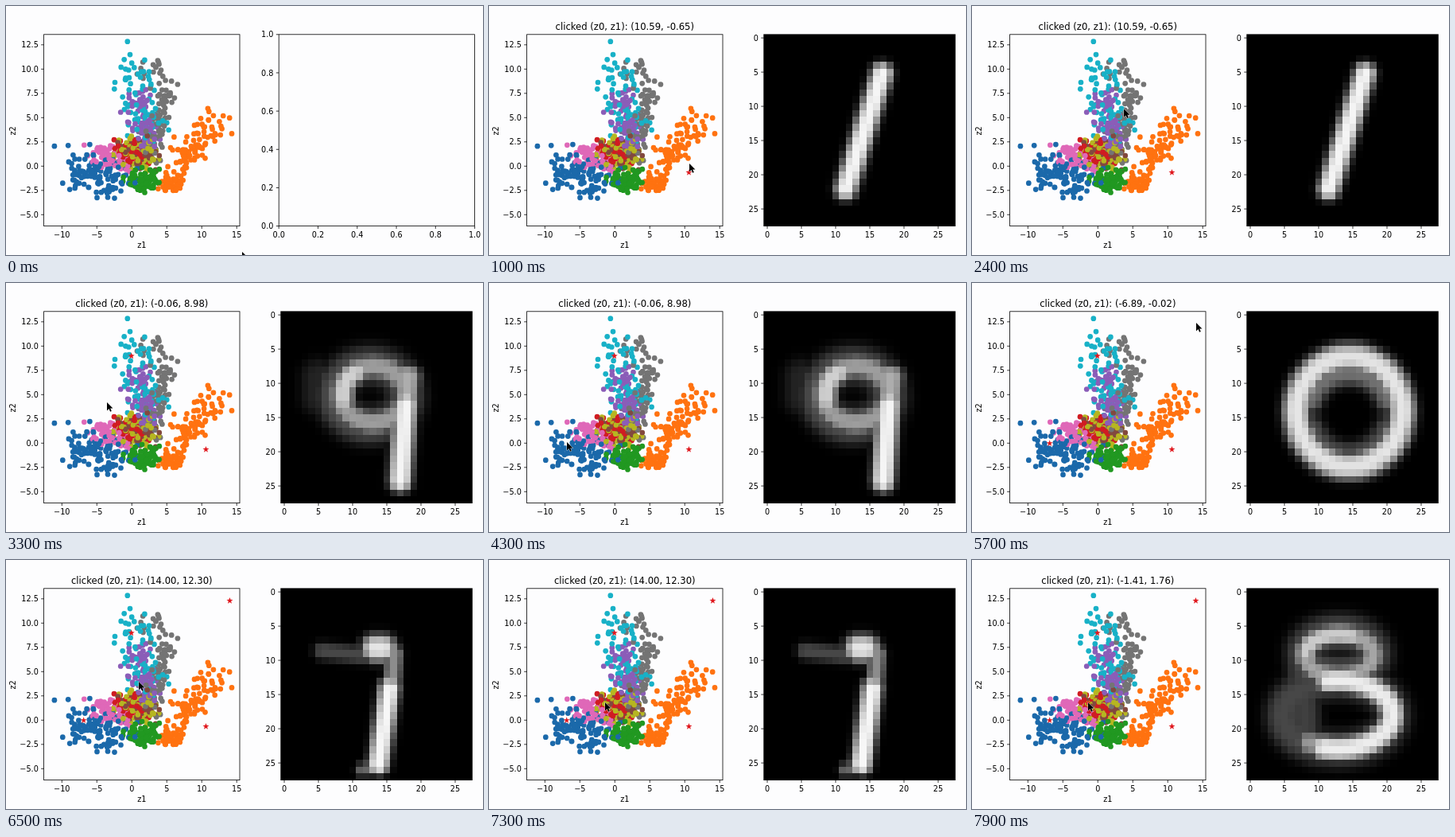
Animation, 600 px wide and 313 px high, one loop 8000 ms. Source, as an HTML page with a canvas:

```html
<!DOCTYPE html>
<html lang="en">
<head>
<meta charset="utf-8">
<title>Latent space explorer</title>
<style>
  html, body { margin: 0; width: 100%; height: 100%; overflow: hidden; background: #fdfdfe; }
  #stage { position: relative; width: 600px; height: 313px; overflow: hidden; }
  svg { position: absolute; left: 0; top: 0; }
  canvas { position: absolute; left: 345.7px; top: 35.8px; width: 240.8px; height: 240.8px; image-rendering: pixelated; }
  text { font: 9.68px "DejaVu Sans", sans-serif; fill: #000; }
  #title { font-size: 11.62px; }
  .line { fill: none; stroke: #000; stroke-width: .8; }
</style>
</head>
<body>
<div id="stage">
  <canvas id="digit" width="28" height="28"></canvas>
  <svg width="600" height="313" viewBox="0 0 600 313">
    <g id="dots"></g>
    <g id="stars" fill="#e0181e"></g>
    <g id="left"></g>
    <g id="unit"></g>
    <g id="pixels"></g>
    <text id="title" x="170.8" y="30.1" text-anchor="middle"></text>
    <path id="cursor" d="M0 0V10.4L2.5 8.1L4.1 11.8L5.8 11L4.2 7.4H7.5Z" stroke="#fff" stroke-width=".8" paint-order="stroke"/>
  </svg>
</div>
<script>
const LOOP = 8000, STEP = 100;
const TOP = 35.8, SIDE = 240.8, BOTTOM = TOP + SIDE, WIDE = 246.4;
const $ = id => document.getElementById(id);
const mix = (a, b, k) => a + (b - a) * k;
const toX = v => 158.3 + v * 8.797;
const toY = v => 201.3 - v * 12.2;

function add(parent, tag, attrs, label) {
  const el = document.createElementNS("http://www.w3.org/2000/svg", tag);
  for (const key in attrs) el.setAttribute(key, attrs[key]);
  if (label !== undefined) el.textContent = label;
  parent.append(el);
  return el;
}

// Axes
function ticks(from, to, by, digits, place) {
  const list = [];
  for (let v = from; v <= to + by / 9; v += by)
    list.push([v.toFixed(digits).replace("-", "−"), place(v)]);
  return list;
}
function axes(group, x, width, xTicks, yTicks) {
  add(group, "rect", { x, y: TOP, width, height: SIDE, class: "line" });
  for (const [label, px] of xTicks) {
    add(group, "path", { d: `M${px} ${BOTTOM}v3.4`, class: "line" });
    add(group, "text", { x: px, y: 291, "text-anchor": "middle" }, label);
  }
  for (const [label, py] of yTicks) {
    add(group, "path", { d: `M${x} ${py}h-3.4`, class: "line" });
    add(group, "text", { x: x - 6.8, y: py + 3.6, "text-anchor": "end" }, label);
  }
}
const cell = SIDE / 28;
axes($("left"), 47.6, WIDE, ticks(-10, 15, 5, 0, toX), ticks(-5, 12.5, 2.5, 1, toY));
add($("left"), "text", { x: 170.8, y: 303.8, "text-anchor": "middle" }, "z1");
add($("left"), "text", { transform: "translate(11.6 157) rotate(-90)", "text-anchor": "middle" }, "z2");
axes($("unit"), 343.2, WIDE, ticks(0, 1, .2, 1, v => 343.2 + v * WIDE), ticks(0, 1, .2, 1, v => BOTTOM - v * SIDE));
axes($("pixels"), 345.7, SIDE, ticks(0, 25, 5, 0, v => 345.7 + (v + .5) * cell), ticks(0, 25, 5, 0, v => TOP + (v + .5) * cell));

// Scatter: each cloud runs from one point and spread to another
let seed = 29;
function random() {
  seed = seed + 0x6D2B79F5 | 0;
  let n = Math.imul(seed ^ seed >>> 15, 1 | seed);
  n = n + Math.imul(n ^ n >>> 7, 61 | n) ^ n;
  return ((n ^ n >>> 14) >>> 0) / 4294967296;
}
const bell = () => (random() + random() + random() - 1.5) * 2;

const dots = [];
function cloud(ink, count, [ax, ay, aw], [bx, by, bw]) {
  for (let i = 0; i < count; i++) {
    const k = random(), w = mix(aw, bw, k);
    dots.push({ ink, x: mix(ax, bx, k) + w * bell(), y: mix(ay, by, k) + w * bell(), order: random() });
  }
}
cloud("#1b69aa", 115, [90, 205, 14], [142, 216, 14]);
cloud("#ff7210", 45, [201, 222, 6], [215, 222, 6]);
cloud("#ff7210", 90, [212, 200, 11], [266, 146, 9]);
cloud("#219821", 85, [157, 220, 6], [190, 218, 7]);
cloud("#df68b8", 60, [108, 183, 8], [150, 198, 7]);
cloud("#d01c22", 60, [143, 183, 6], [163, 185, 8]);
cloud("#82493f", 50, [145, 172, 9], [183, 194, 9]);
cloud("#8b5db8", 80, [160, 115, 10], [182, 176, 8]);
cloud("#747474", 22, [182, 66, 9], [190, 105, 12]);
cloud("#747474", 75, [206, 108, 5], [180, 185, 8]);
cloud("#b6b621", 60, [145, 181, 9], [184, 188, 9]);
cloud("#18b1c7", 78, [156, 72, 11], [182, 165, 12]);
dots.sort((a, b) => a.order - b.order);
for (const { ink, x, y } of dots)
  add($("dots"), "circle", { cx: x.toFixed(1), cy: y.toFixed(1), r: 3.35, fill: ink });

// Decoded digits: soft strokes on the 28 x 28 grid
const SAMPLES = 48;
function stroke(radius, light, at) {
  const points = Array.from({ length: SAMPLES + 1 }, (_, i) => at(i / SAMPLES));
  return (x, y) => {
    const d = Math.min(...points.map(([px, py]) => Math.hypot(x - px, y - py)));
    return light * Math.exp(-((d / radius) ** 3));
  };
}
const line = (radius, light, [ax, ay], [bx, by]) =>
  stroke(radius, light, k => [mix(ax, bx, k), mix(ay, by, k)]);
const arc = (radius, light, [cx, cy], [rx, ry], from = 0, to = 360) =>
  stroke(radius, light, k => {
    const a = mix(from, to, k) * Math.PI / 180;
    return [cx + rx * Math.cos(a), cy + ry * Math.sin(a)];
  });

const one = [line(1.65, .96, [16.8, 5.2], [11.5, 22])];
const nine = [
  arc(2.8, .32, [12.6, 11.7], [5.2, 4.4]),
  arc(1.8, .62, [13, 11.6], [4.8, 4.1]),
  arc(1.7, .82, [13, 11.6], [4.5, 4], 170, 235),
  line(2.6, .14, [5, 9], [5, 12]),
  line(1.8, .68, [18.2, 9], [17.8, 14]),
  line(1.7, .96, [17.8, 13], [17, 24.2])
];
const zero = [
  arc(2, .9, [14.5, 14.1], [7.8, 8]),
  arc(2.2, .45, [14.5, 14.1], [6.3, 6], 200, 340),
  arc(2, .3, [14.5, 14.5], [6, 6], 20, 160)
];
const seven = [
  line(1.3, .28, [5.5, 8.6], [11, 9.2]),
  line(2, .9, [13.3, 8.2], [14.4, 8.2]),
  line(1.3, .55, [16.1, 9], [15.8, 13]),
  line(1.55, .97, [15.4, 14], [13.8, 25.2]),
  line(1.1, .4, [12, 25.8], [11.5, 26])
];
const three = [
  arc(2.8, .32, [13, 9], [5, 3]),
  arc(2.7, .28, [12.8, 18], [8, 5]),
  line(2.4, .25, [7.5, 9], [8, 21]),
  arc(1.6, .65, [13, 9.2], [5, 3.1]),
  arc(1.5, .8, [13, 9.2], [5, 3], 190, 290),
  arc(1.8, .93, [12.8, 17.9], [8, 5], -100, 105),
  line(1.7, .6, [8.5, 22], [12, 22.8])
];
function paint(strokes) {
  const ctx = $("digit").getContext("2d");
  const image = ctx.createImageData(28, 28);
  for (let i = 0; i < 784; i++) {
    const value = Math.max(...strokes.map(glow => glow(i % 28, Math.floor(i / 28))));
    image.data.fill(Math.round(value * 255), i * 4, i * 4 + 3);
    image.data[i * 4 + 3] = 255;
  }
  ctx.putImageData(image, 0, 0);
}

// Clicks: time, latent point, decoded digit
const CLICKS = [
  [1000, 10.59, -0.65, one],
  [2900, -0.06, 8.98, nine],
  [4400, -6.89, -0.02, zero],
  [5900, 14, 12.3, seven],
  [7600, -1.41, 1.76, three]
];
const stars = CLICKS.map(([, zx, zy]) => {
  const points = Array.from({ length: 10 }, (_, i) => {
    const a = i * Math.PI / 5, r = i % 2 ? 1.7 : 4.2;
    return [toX(zx) + r * Math.sin(a), toY(zy) - r * Math.cos(a)];
  });
  return add($("stars"), "polygon", { points: points.join(" ") });
});

let shown;
function show(count) {
  if (count === shown) return;
  shown = count;
  stars.forEach((star, i) => star.style.display = i < count ? "" : "none");
  $("unit").style.display = count ? "none" : "";
  $("pixels").style.display = $("digit").style.display = count ? "" : "none";
  $("title").textContent = "";
  if (!count) return;
  const [, zx, zy, strokes] = CLICKS[count - 1];
  $("title").textContent = `clicked (z0, z1): (${zx.toFixed(2)}, ${zy.toFixed(2)})`;
  paint(strokes);
}

// Pointer path: time, x, y
const PATH = [
  [0, 297, 309], [1000, 252, 198], [1800, 252, 198], [2800, 158, 92], [3300, 127, 150],
  [4200, 98, 200], [4600, 98, 200], [5400, 282, 50], [6300, 282, 50], [6500, 167, 153],
  [7200, 146, 179], [LOOP, 146, 179]
];
function pointer(t) {
  const i = PATH.findIndex(key => key[0] > t);
  const [t0, x0, y0] = PATH[i - 1], [t1, x1, y1] = PATH[i];
  const k = (t - t0) / (t1 - t0), ease = k * k * (3 - 2 * k);
  return [mix(x0, x1, ease), mix(y0, y1, ease)];
}

const start = performance.now();
function frame() {
  const t = Math.floor((performance.now() - start) % LOOP / STEP) * STEP;
  show(CLICKS.filter(([time]) => time <= t).length);
  $("cursor").setAttribute("transform", `translate(${pointer(t)})`);
  requestAnimationFrame(frame);
}
frame();
</script>
</body>
</html>
```
